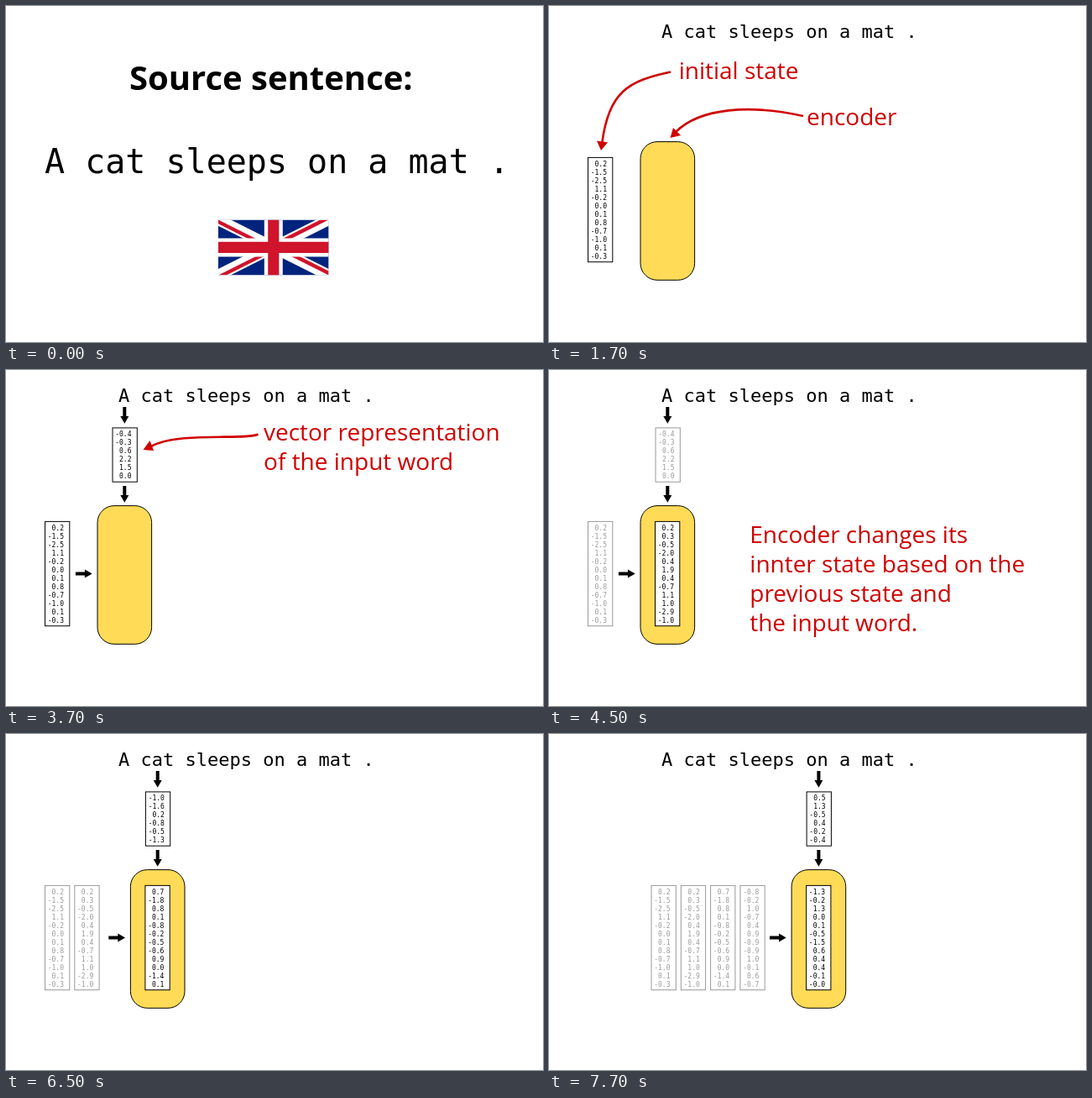
Write an HTML page that moves like this. It is 640 px wide and 400 px high and loops after 8000 ms.

```html
<!DOCTYPE html>
<html>
<head>
<meta charset="utf-8">
<style>
  html, body { margin: 0; width: 100%; height: 100%; overflow: hidden; background: #fff; }
  svg { display: block; width: 640px; height: 400px; }
  text { white-space: pre; }
  .mono { font-family: "DejaVu Sans Mono", monospace; }
  .sans { font-family: "Open Sans", sans-serif; }
  .note { font-size: 28px; fill: #d00000; }
  .vector { font-size: 8px; stroke: none; }
</style>
</head>
<body>
<svg id="stage" viewBox="0 0 640 400"></svg>
<script>
const SENTENCE = 'A cat sleeps on a mat .';
const GREY = '#999';

const states = [
  '0.2 -1.5 -2.5 1.1 -0.2 0.0 0.1 0.8 -0.7 -1.0 0.1 -0.3',
  '0.2 0.3 -0.5 -2.0 0.4 1.9 0.4 -0.7 1.1 1.0 -2.9 -1.0',
  '0.7 -1.8 0.8 0.1 -0.8 -0.2 -0.5 -0.6 0.9 0.0 -1.4 0.1',
  '-0.8 -0.2 1.0 -0.7 0.4 0.9 -0.9 -0.9 1.0 -0.1 0.6 -0.7',
  '-1.3 -0.2 1.3 0.0 0.1 -0.5 -1.5 0.6 0.4 0.4 -0.1 -0.0'
];
const inputs = [
  '-0.4 -0.3 0.6 2.2 1.5 0.0',
  '-1.0 -1.6 0.2 -0.8 -0.5 -1.3',
  '-0.4 -0.9 0.4 -0.1 1.0 1.1',
  '0.5 1.3 -0.5 0.4 -0.2 -0.4'
];

const text = (x, y, content, attrs) => `<text x="${x}" y="${y}" ${attrs}>${content}</text>`;
const note = (x, y, ...lines) =>
  lines.map((line, i) => text(x, y + 35 * i, line, 'class="sans note"')).join('');
const sentence = () => text(134, 38, SENTENCE, 'class="mono" font-size="22"');

function vector(x, y, values, color = '#000') {
  const rows = values.split(' ');
  const height = rows.length * 10 + 4.3;
  return `<rect x="${x}" y="${y}" width="29.3" height="${height}" fill="#fff" stroke="${color}"/>` +
    rows.map((v, i) => text(x + 22.5, y + 10.4 + 10 * i, v,
      `class="mono vector" text-anchor="end" fill="${color}"`)).join('');
}
const state = (x, i, color) => vector(x, 180.4, states[i], color);
const input = (cx, i, color) => vector(cx - 14.3, 68.9, inputs[i], color);

const encoder = cx =>
  `<rect x="${cx - 32.3}" y="161.6" width="64.6" height="164.7" rx="20" fill="#ffdb57" stroke="#000"/>`;

const arrow = (x, y, angle = 0) =>
  `<path d="M-2 0H2V11H5L0 19.8L-5 11H-2Z" transform="translate(${x} ${y}) rotate(${angle})"/>`;
const arrows = cx => arrow(cx, 44) + arrow(cx, 138) + arrow(cx - 58.4, 242.5, -90);

const pointer = (curve, head) =>
  `<path d="${curve}" fill="none" stroke="#d00000" stroke-width="2.6"/>` +
  `<polygon points="${head}" fill="#d00000"/>`;

// Earlier states in grey from left, then the encoder reading the word at cx.
function step(cx, left, n) {
  const history = states.slice(0, n + 1).map((_, i) => state(left + 35.3 * i, i, GREY)).join('');
  return sentence() + history + arrows(cx) + input(cx, n) + encoder(cx) + state(cx - 14.8, n + 1);
}

const flag = `<svg x="253" y="254.4" width="131.6" height="66" viewBox="0 0 60 30" preserveAspectRatio="none">
  <clipPath id="turns"><path d="M30 15H60V30zV30H0zH0V0zV0H60z"/></clipPath>
  <path d="M0 0H60V30H0z" fill="#00247d"/>
  <path d="M0 0L60 30M60 0L0 30" stroke="#fff" stroke-width="6"/>
  <path d="M0 0L60 30M60 0L0 30" stroke="#cf142b" stroke-width="4" clip-path="url(#turns)"/>
  <path d="M30 0V30M0 15H60" stroke="#fff" stroke-width="10"/>
  <path d="M30 0V30M0 15H60" stroke="#cf142b" stroke-width="6"/>
</svg>`;

const first = 141.3;
const scenes = [
  [500, text(147, 100, 'Source sentence:', 'class="sans" font-size="40" font-weight="700"') +
    text(46, 199, SENTENCE, 'class="mono" font-size="40"') + flag],
  [2000, sentence() + state(46.5, 0) + encoder(first) +
    note(154.7, 87, 'initial state') + note(307, 142, 'encoder') +
    pointer('M145 78.5C95 89 71 102 63.3 163', '57,160.5 70,162.3 62,172') +
    pointer('M303 131C240 117 180 121 151 150', '148,145 157,154 144.5,157')],
  [2000, sentence() + state(46.5, 0) + arrows(first) + input(first, 0) + encoder(first) +
    note(307, 84, 'vector representation', 'of the input word') +
    pointer('M300.5 76.5C285 84 205 73 173 91', '171.5,84 176,96 163.5,95')],
  [2000, sentence() + state(46.5, 0, GREY) + arrows(first) + input(first, 0, GREY) +
    encoder(first) + state(first - 14.8, 1) +
    note(239.3, 206, 'Encoder changes its', 'innter state based on the', 'previous state and', 'the input word.')],
  [600, step(180.7, 46.5, 1)],
  [600, step(258.5, 92, 2)],
  [300, step(321.4, 122, 3)]
];

const stage = document.getElementById('stage');
const total = scenes.reduce((sum, [duration]) => sum + duration, 0);
const start = performance.now();
let shown = -1;

function draw() {
  let time = (performance.now() - start) % total;
  let index = 0;
  while (time >= scenes[index][0]) time -= scenes[index++][0];
  if (index !== shown) stage.innerHTML = scenes[shown = index][1];
  requestAnimationFrame(draw);
}
draw();
</script>
</body>
</html>
```
